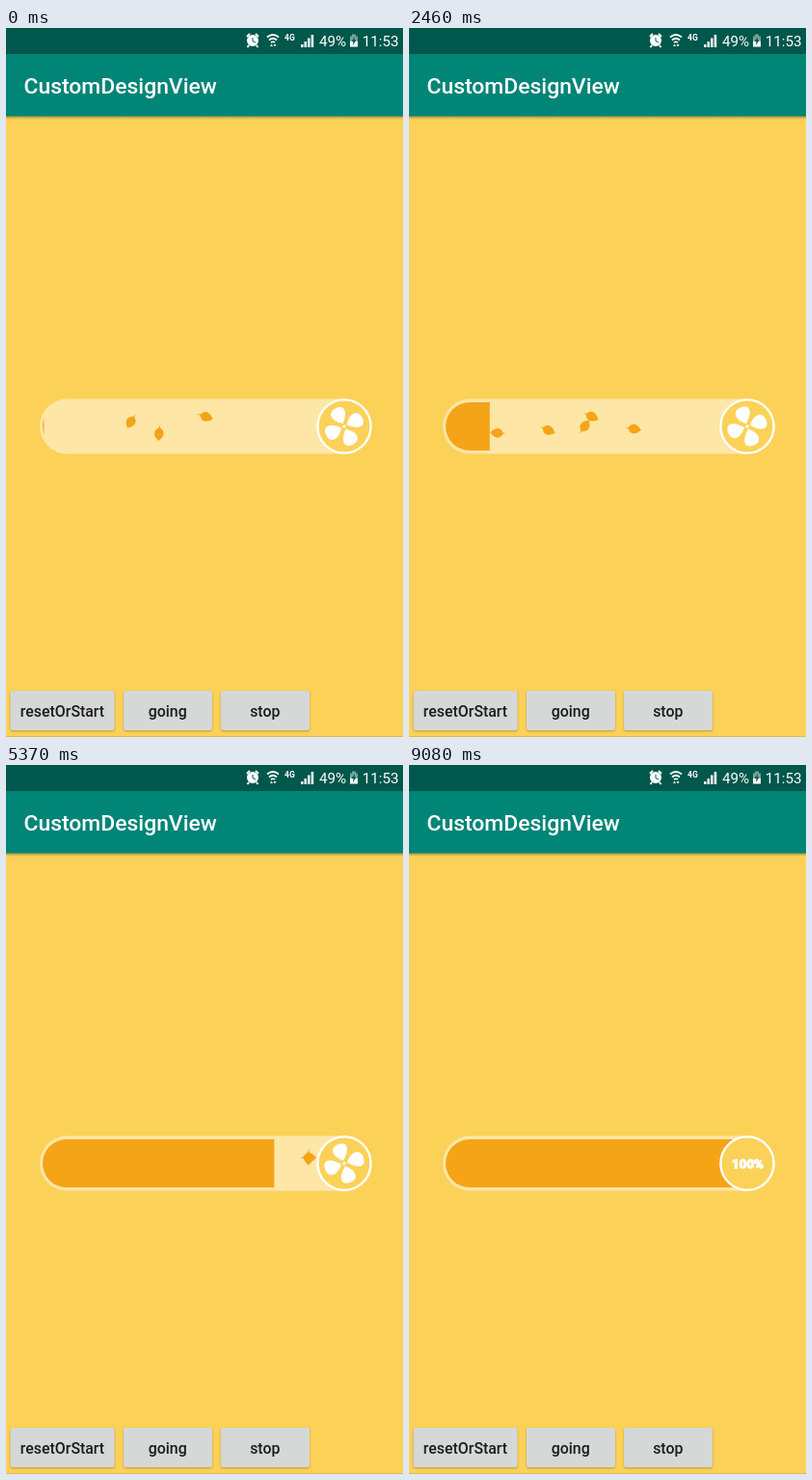
Animation, 412 px wide and 735 px high, one loop 9180 ms. Source, as an HTML page:

```html
<!DOCTYPE html>
<html lang="en">
<head>
<meta charset="utf-8">
<title>Leaf loading bar</title>
<style>
  html, body { margin: 0; width: 100%; height: 100%; overflow: hidden; background: #fcd158; }
  svg { display: block; width: 412px; height: 735px; font-family: Roboto, sans-serif; }
  .button rect { fill: #d6d7d7; filter: drop-shadow(0 1px 1px #0004); }
  .button text { font-size: 15.9px; font-weight: 500; fill: #1c1c1c; text-anchor: middle; }
  .pressed rect { fill: #c5c5c5; }
</style>
</head>
<body>
<svg viewBox="0 0 412 735">
  <defs>
    <linearGradient id="shade" x2="0" y2="1">
      <stop stop-color="#000" stop-opacity=".3"/>
      <stop offset="1" stop-color="#000" stop-opacity="0"/>
    </linearGradient>
    <clipPath id="tube"><rect x="38" y="388" width="330" height="50" rx="25"/></clipPath>
    <path id="petal" d="M0-3C-5-7-8.5-11-7.5-16C-6.5-22 6-22.5 7.5-17C8.5-12 4-7 0-3Z"/>
    <path id="leaf" d="M9 0L5.5-.7C3-5.5-2-7-8 0C-2 7 3 5.5 5.5 .7Z"/>
  </defs>
  <rect width="412" height="735" fill="#fcd158"/>
  <rect y="734" width="412" height="1" fill="#dcb75c"/>

  <rect y="91" width="412" height="4" fill="url(#shade)"/>
  <rect width="412" height="91.5" fill="#008577"/>
  <rect width="412" height="27" fill="#00574b"/>
  <text x="18.5" y="68" font-size="22.9" font-weight="500" fill="#fff">CustomDesignView</text>

  <g fill="#fff">
    <circle cx="256" cy="13" r="6"/>
    <path d="M250 9l3-3M262 9l-3-3M252 18l-1.5 2M260 18l1.5 2" stroke="#fff" stroke-width="2"/>
    <path d="M256 10v3.5l3 1.5" fill="none" stroke="#00574b"/>
    <path d="M271 9.5q6-5 12 0M273 12.5q4-3.5 8 0M275 15q2-1.5 4 0" fill="none" stroke="#fff" stroke-width="1.7"/>
    <path d="M274 19l1.5-2.5 1.5 2.5zM277.500 17h3l-1.500 2.500z"/>
    <text x="289" y="13" font-size="8.5" font-weight="700">4G</text>
    <path d="M306 17h2.500v3h-2.500zM309.500 14h2.500v6h-2.500zM313 10.500h2.500v9.500h-2.500zM316.700 7h2.500v13h-2.500z"/>
    <text x="325" y="19" font-size="15.2">49%</text>
    <path d="M357 8.500h2v-2h4v2h2v5h-8z" opacity=".45"/>
    <path d="M357 13.500h8v6h-8z"/>
    <path d="M362 9l-3.500 5h2l-.5 4 3.500-5.500h-2z" fill="#00574b"/>
    <text x="407.500" y="19" font-size="15.2" text-anchor="end">11:53</text>
  </g>

  <rect x="35" y="384.500" width="344" height="57" rx="28.500" fill="#fde6a6"/>
  <g clip-path="url(#tube)" fill="#f5a418">
    <g id="leaves"></g>
    <rect id="fill" x="38" y="388" height="50"/>
  </g>
  <circle cx="351" cy="413" r="27.600" fill="#fcd158" stroke="#fff" stroke-width="2.400"/>
  <g id="fan" fill="#fff">
    <circle r="1.600"/>
    <use href="#petal"/>
    <use href="#petal" transform="rotate(90)"/>
    <use href="#petal" transform="rotate(180)"/>
    <use href="#petal" transform="rotate(270)"/>
  </g>
  <text id="done" y="4.800" font-size="13.400" font-weight="700" text-anchor="middle"
        fill="#fff" stroke="#fff" stroke-width="1.300">100%</text>

  <g class="button"><rect x="4.600" y="687" width="108" height="41" rx="2"/><text x="58.500" y="714">resetOrStart</text></g>
  <g class="button" id="going"><rect x="122" y="687" width="92" height="41" rx="2"/><text x="167.700" y="714">going</text></g>
  <g class="button"><rect x="223" y="687" width="92" height="41" rx="2"/><text x="268.800" y="714">stop</text></g>
</svg>
<script>
const LOOP = 9180, SPIN = 0.186, DRIFT = 0.107;
const $ = id => document.getElementById(id);
const clamp = v => Math.max(0, Math.min(1, v));

// Each leaf leaves the fan at a time, with a wave phase and a stem angle.
const leaves = [
  [-2056, 70, 323], [-1785, -60, 302], [-1336, 0, 86], [51, 30, 274], [537, 0, 202],
  [958, 24, 285], [893, 200, 57], [1367, 150, 344], [5034, 0, 242], [5034, 0, 208]
].map(([born, phase, stem], i) => {
  const node = document.createElementNS("http://www.w3.org/2000/svg", "use");
  node.setAttribute("href", "#leaf");
  $("leaves").append(node);
  return { node, born, phase, stem, turn: i % 2 ? SPIN : -SPIN };
});

// The fill starts slowly, then gains a steady speed.
function fillWidth(t) {
  const ramp = 867, run = Math.max(0, t - 1250);
  return Math.min(314, 1.3 + 0.0715 * (Math.hypot(run, ramp) - ramp));
}

function draw(t) {
  for (const { node, born, phase, stem, turn } of leaves) {
    const age = t - born, x = 350 - DRIFT * age;
    const wave = (360 * (x - 38) / 284 + phase) * Math.PI / 180;
    const y = 409 + 11 * Math.sin(wave);
    node.setAttribute("transform", `translate(${x} ${y}) rotate(${stem + turn * age})`);
    node.setAttribute("visibility", x > 39 && x < 348 ? "visible" : "hidden");
  }
  $("fill").setAttribute("width", fillWidth(t));
  const shrink = 1 - clamp((t - 6330) / 450), grow = clamp((t - 6780) / 700);
  $("fan").setAttribute("transform", `translate(351 413) rotate(${SPIN * t - 26}) scale(${shrink})`);
  $("done").setAttribute("transform", `translate(351.5 413.5) scale(${grow})`);
  $("going").classList.toggle("pressed", t >= 1300 && t < 1700);
}

const start = performance.now();
function tick() {
  draw((performance.now() - start) % LOOP);
  requestAnimationFrame(tick);
}
tick();
</script>
</body>
</html>
```
